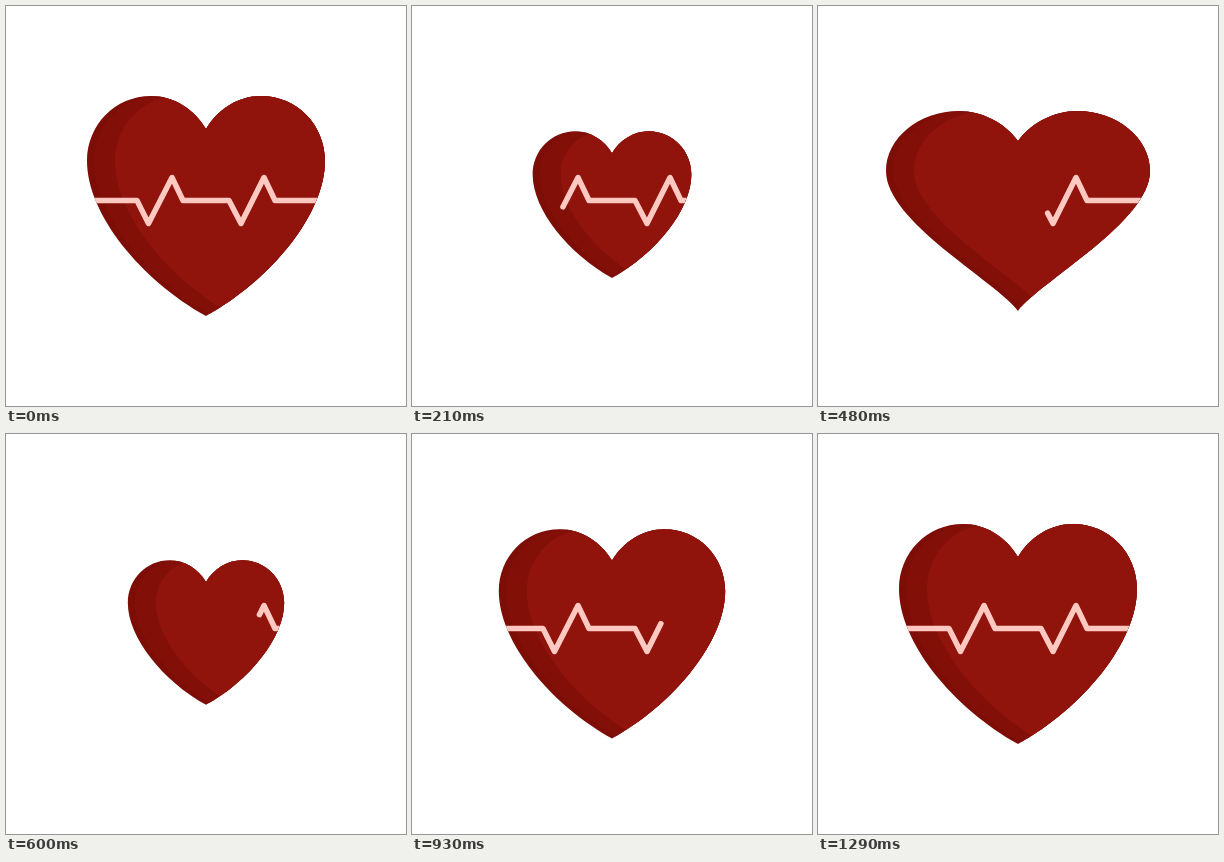
An HTML page with a canvas that plays this animation: 400x400 px, repeating every 3.71 s.

```html
<!DOCTYPE html>
<html lang="en">
<head>
<meta charset="utf-8">
<title>Heartbeat</title>
<style>
html, body { margin: 0; width: 100%; height: 100%; overflow: hidden; background: #fff; }
canvas { display: block; width: 100vmin; height: 100vmin; margin: auto; }
</style>
</head>
<body>
<canvas id="stage"></canvas>
<script>
const SIZE = 400, LOOP = 3710, STEP = 30, MOVE = 1290, MID = 200;
const canvas = document.getElementById('stage');
const ctx = canvas.getContext('2d');

// Right half of the heart, notch to tip; x is measured from the middle.
const full = [[0, 123], [11.5, 103.5], [32, 90], [55, 90], [91, 90], [119, 119],
  [119, 155], [119, 208], [65, 274], [0, 310]];
const wide = [[0, 135], [13, 117], [36, 105], [59, 105], [99, 105], [132, 132],
  [132, 165], [132, 216], [22, 275], [0, 305]];
const small = full.map(([x, y]) => [x * 0.657, 198.5 + (y - 200) * 0.657]);

const smooth = u => u * u * (3 - 2 * u);
const easeOut = power => u => 1 - (1 - u) ** power;
const clamp = u => Math.min(1, Math.max(0, u));

// Two beats: swell, contract, recover.
const keys = [
  [0, full], [67, wide, smooth], [187, small, smooth], [413, full, smooth],
  [480, wide, smooth], [600, small, smooth], [MOVE, full, easeOut(3)]
];

function heartAt(t) {
  const i = Math.max(1, keys.findIndex(k => k[0] >= t));
  const [t0, from] = keys[i - 1], [t1, to, ease] = keys[i];
  const u = ease((t - t0) / (t1 - t0));
  return from.map(([x, y], n) => [x + (to[n][0] - x) * u, y + (to[n][1] - y) * u]);
}

function curve(path, pts, side, dx = 0) {
  for (let i = 0; i < pts.length; i += 3) {
    path.bezierCurveTo(...pts.slice(i, i + 3).flatMap(([x, y]) => [MID + side * x + dx, y]));
  }
}

function outline(pts) {
  const path = new Path2D();
  path.moveTo(MID, pts[0][1]);
  curve(path, pts.slice(1), 1);
  curve(path, pts.slice(0, -1).reverse(), -1);
  path.closePath();
  return path;
}

// Everything to the right of the left contour moved by dx.
function inside(pts, dx) {
  const path = new Path2D();
  const [topX, topY] = pts[3];
  path.moveTo(MID - topX + dx, topY);
  curve(path, pts.slice(4), -1, dx);
  path.lineTo(SIZE, pts[9][1]);
  path.lineTo(SIZE, 0);
  path.lineTo(MID - topX + dx, 0);
  path.closePath();
  return path;
}

const pulse = [[83, 194.5], [131, 194.5], [142.5, 217.5], [166, 171.5], [177, 194.5],
  [223, 194.5], [235, 217.5], [258, 171.5], [269, 194.5], [336, 194.5]];
const pulseLength = pulse.slice(1).reduce((sum, [x, y], i) =>
  sum + Math.hypot(x - pulse[i][0], y - pulse[i][1]), 0);

function drawPulse(from, to) {
  if (to - from < 0.5) return;
  ctx.setLineDash([to - from, 2000]);
  ctx.lineDashOffset = -from;
  ctx.beginPath();
  pulse.forEach(p => ctx.lineTo(...p));
  ctx.stroke();
}

function draw(t) {
  const pts = heartAt(t);
  ctx.fillStyle = '#fff';
  ctx.fillRect(0, 0, SIZE, SIZE);

  ctx.save();
  const heart = outline(pts);
  ctx.fillStyle = '#7d0d07';
  ctx.fill(heart);
  ctx.clip(heart);
  ctx.fillStyle = '#820f08';
  ctx.fill(inside(pts, 7));
  ctx.fillStyle = '#91140c';
  ctx.fill(inside(pts, 28));

  ctx.strokeStyle = '#ffc9c1';
  ctx.lineWidth = 5.5;
  ctx.lineCap = ctx.lineJoin = 'round';
  if (t < MOVE) {
    drawPulse(t * 0.44, pulseLength);
    drawPulse(0, 349 * easeOut(2)(clamp((t - 600) / (MOVE - 600))));
  } else {
    drawPulse(0, pulseLength);
  }
  ctx.restore();
}

function resize() {
  const px = Math.round(Math.min(innerWidth, innerHeight) * devicePixelRatio) || SIZE;
  if (canvas.width !== px) canvas.width = canvas.height = px;
  ctx.setTransform(px / SIZE, 0, 0, px / SIZE, 0, 0);
}

const start = performance.now();
function tick() {
  const t = (performance.now() - start) % LOOP;
  resize();
  draw(Math.min(MOVE, Math.floor(t / STEP) * STEP));
  requestAnimationFrame(tick);
}
tick();
</script>
</body>
</html>
```
